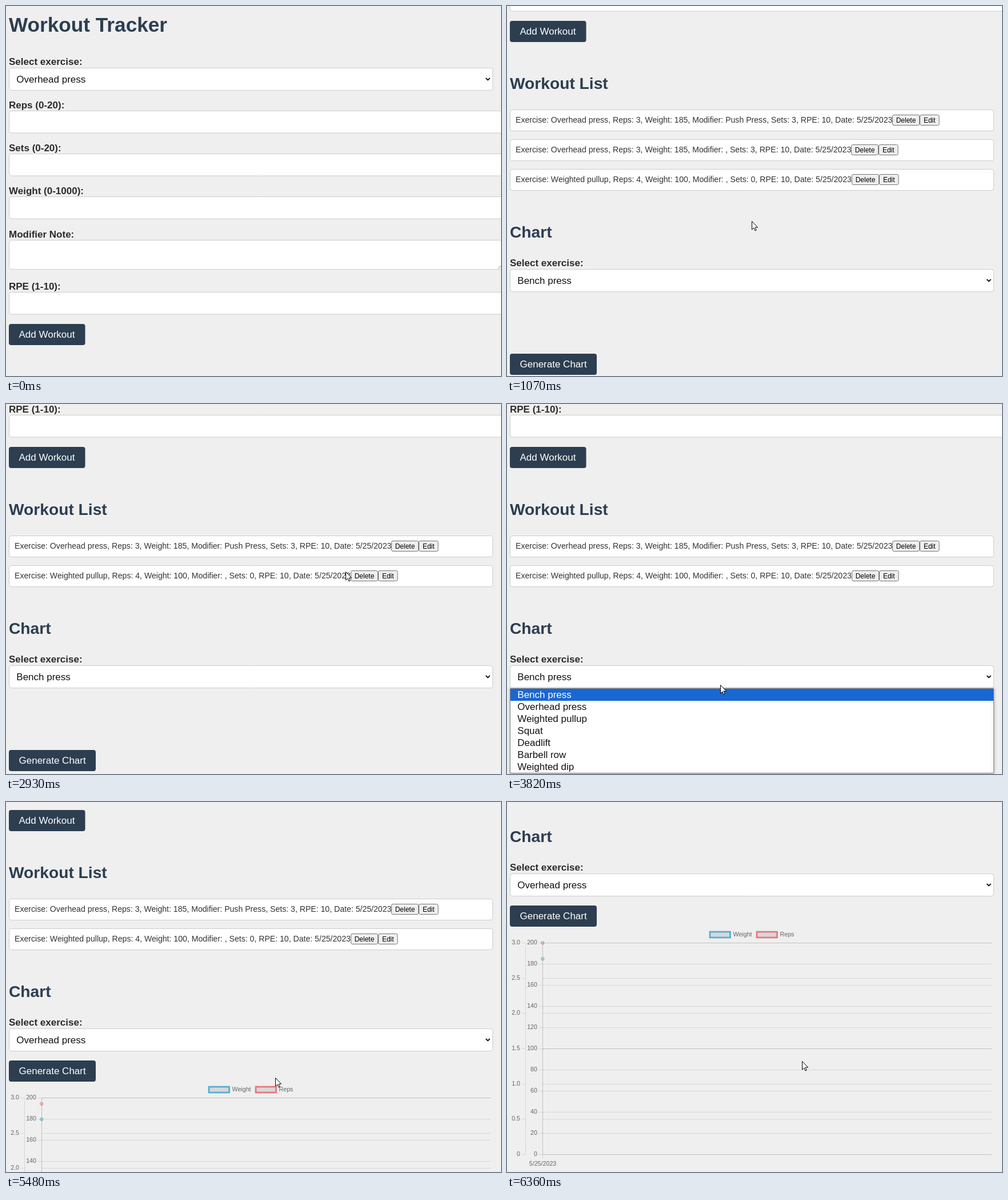
An HTML page with a canvas for the animation above (7.18 s loop, 866 by 647 pixels).

```html
<!DOCTYPE html>
<html lang="en">
<head>
<meta charset="utf-8">
<title>Workout Tracker</title>
<style>
html, body { margin: 0; width: 100%; height: 100%; overflow: hidden; background: #efefef; }
canvas { display: block; }
</style>
</head>
<body>
<canvas id="stage" width="866" height="647"></canvas>
<script>
const ctx = document.getElementById('stage').getContext('2d');
const LOOP = 7180, ENTER = 90, DELETED = 2300, POPUP_OPEN = 3750, CHOSEN = 4150, CHARTED = 4890;
const NAVY = '#2c3e50', INK = '#2b2b2b', GREY = '#666', FAINT = 'rgba(0,0,0,.1)';
const LEFT = 5, ROW_PITCH = 52, CLICK_LENGTH = 180;

// Each move is [start, end, ...destination]
const scrollMoves = [[392, 1100, 533], [DELETED, DELETED, 481], [5294, 5980, 813]];
const pointerMoves = [
  [ENTER, 700, 455, 382], [700, 1070, 428, 376], [1200, 1660, 620, 259], [1820, 2140, 624, 243],
  [2510, 2930, 594, 293], [2930, 3200, 377, 430], [3250, 3600, 372, 478], [3780, 3900, 375, 526],
  [4200, 4710, 66, 620], [4950, 5480, 471, 482], [5700, 6360, 516, 453]
];
const clicks = [2140, 3620, 4070, 4750];

const rowText = (exercise, reps, weight, modifier, sets) =>
  `Exercise: ${exercise}, Reps: ${reps}, Weight: ${weight}, Modifier: ${modifier}, Sets: ${sets}, RPE: 10, Date: 5/25/2023`;
const rows = [
  rowText('Overhead press', 3, 185, 'Push Press', 3),
  rowText('Overhead press', 3, 185, '', 3),
  rowText('Weighted pullup', 4, 100, '', 0)
];
const options = ['Bench press', 'Overhead press', 'Weighted pullup', 'Squat', 'Deadlift', 'Barbell row', 'Weighted dip'];

const arrow = new Path2D('M.5 .5V15l3.3-3.1 2.2 5.1 2.2-1-2.2-4.9h4.7z');
const hand = new Path2D('M0 11V2.5a1.5 1.5 0 0 1 3 0V8q2.8-.9 3 .8 2.6-.6 2.8 1 2.2-.2 2.2 1.6V15l-1.6 5.5H1.5L-3.5 13.5q.2-2.6 3.5-.5z');

const smooth = k => k * k * (3 - 2 * k);

function follow(moves, position, t) {
  for (const [start, end, ...goal] of moves) {
    if (t < start) break;
    const k = t < end ? smooth((t - start) / (end - start)) : 1;
    position = position.map((v, i) => v + (goal[i] - v) * k);
  }
  return position.map(Math.round);
}

function text(str, x, y, size = 17, color = INK, weight = 'normal', align = 'left') {
  ctx.font = `${weight} ${size}px "Liberation Sans", Arial, sans-serif`;
  ctx.fillStyle = color;
  ctx.textAlign = align;
  ctx.fillText(str, x, y);
}

function box(x, y, w, h, fill, stroke, radius = 4) {
  ctx.beginPath();
  ctx.roundRect(x, y, w, h, radius);
  ctx.fillStyle = fill;
  ctx.fill();
  if (!stroke) return;
  ctx.strokeStyle = stroke;
  ctx.lineWidth = 1;
  ctx.stroke();
}

function line(points, color = FAINT, width = 1) {
  ctx.beginPath();
  points.forEach(([x, y]) => ctx.lineTo(x, y));
  ctx.strokeStyle = color;
  ctx.lineWidth = width;
  ctx.stroke();
}

const heading = (str, y, size = 28.2) => text(str, LEFT, y, size, NAVY, 'bold');
const label = (str, y) => text(str, LEFT, y, 17, INK, 'bold');
const field = (y, h, w = 900) => box(LEFT + .5, y + .5, w, h, '#fff', '#ccc');

function select(value, y) {
  label('Select exercise:', y - 5);
  field(y, 39, 846);
  text(value, 18.3, y + 25.5, 17, '#111');
  line([[839.5, y + 18], [843, y + 21.5], [846.5, y + 18]], '#111', 1.9);
}

function bigButton(str, y, w, hovered) {
  box(LEFT, y, w, 37, hovered ? '#34495e' : NAVY);
  text(str, 22.5, y + 24, 17, '#fff');
}

function smallButton(str, x, y, w, hovered) {
  box(x, y, w, 18, hovered ? '#e2e2e2' : '#efefef', '#767676', 2.5);
  text(str, x + w / 2, y + 13.3, 12, '#000', 'normal', 'center');
}

function drawForm() {
  heading('Workout Tracker', 45, 35.2);
  select('Overhead press', 108);
  let y = 179;
  for (const name of ['Reps (0-20):', 'Sets (0-20):', 'Weight (0-1000):', 'Modifier Note:', 'RPE (1-10):']) {
    const multiline = name.startsWith('Modifier');
    const base = Math.round(y);
    label(name, base);
    field(base + 4, multiline ? 51 : 38.5);
    if (multiline) line([[861.5, base + 54], [868, base + 47.5]], '#777');
    y += multiline ? 91.2 : 75.2;
  }
  bigButton('Add Workout', 556, 133.5);
}

function drawList(visible, over) {
  heading('Workout List', 675);
  visible.forEach((row, i) => {
    const y = 711 + i * ROW_PITCH;
    field(y, 37, 846);
    text(row, 15, y + 23, 14.1, '#333');
    const end = Math.round(15 + ctx.measureText(row).width) + .5;
    smallButton('Delete', end, y + 9.5, 47, over(end, y + 9, 47, 19));
    smallButton('Edit', end + 48, y + 9.5, 33.5);
  });
}

function drawChart(age) {
  const top = 246.5, height = 370, bottom = top + height;
  const grow = 1 - (1 - Math.min(age / 1000, 1)) ** 4;

  function axis(x, steps, caption) {
    line([[x, top], [x, bottom]]);
    for (let i = 0; i <= steps; i++) {
      const y = Math.floor(bottom - i * height / steps) + .5;
      line([[x - 7, y], [x, y]]);
      line([[62, y], [848, y]]);
      text(caption(i), x - 9.5, y + 2.8, 10.7, GREY, 'normal', 'right');
    }
  }
  axis(32.5, 6, i => i ? (i / 2).toFixed(1) : '0');
  axis(62.5, 10, i => i * 20);
  line([[62.5, top], [62.5, bottom + 7]]);
  text('5/25/2023', 62.5, 635.5, 10.7, GREY, 'normal', 'center');

  [['Weight', '#52aed0', 185 / 200], ['Reps', '#e8757c', 1]].forEach(([name, color, value], i) => {
    const x = 355 + i * 82;
    ctx.fillStyle = FAINT;
    ctx.strokeStyle = color;
    ctx.lineWidth = 2.7;
    ctx.fillRect(x, 227, 35.5, 10);
    ctx.strokeRect(x, 227, 35.5, 10);
    text(name, x + 40.5, 235, 10.7, GREY);
    box(59.7, bottom - height * value * grow - 2.6, 5.2, 5.2, FAINT, color, 2.6);
  });
}

function drawPopup(y, hoverY) {
  const rowHeight = 21;
  const active = Math.max(0, Math.floor((hoverY - y) / rowHeight));
  ctx.shadowColor = 'rgba(0,0,0,.3)';
  ctx.shadowBlur = 5;
  box(LEFT + .5, y + .5, 846, options.length * rowHeight + 1, '#fff', '#888', 0);
  ctx.shadowBlur = 0;
  options.forEach((name, i) => {
    const rowY = y + 1 + i * rowHeight;
    if (i === active) box(6, rowY, 845, rowHeight, '#1967d2', null, 0);
    text(name, 18.3, rowY + 16, 17, i === active ? '#fff' : '#111');
  });
}

function drawPointer(x, y, shape, pressed) {
  ctx.save();
  ctx.translate(x, y);
  if (pressed) box(-11, -9, 22, 22, 'rgba(200,190,20,.75)', null, 11);
  ctx.fillStyle = '#fff';
  ctx.strokeStyle = '#000';
  ctx.lineWidth = 1;
  ctx.fill(shape);
  ctx.stroke(shape);
  ctx.restore();
}

function render(t) {
  const [scroll] = follow(scrollMoves, [0], t);
  const [px, py] = follow(pointerMoves, [866, 330], t);
  const over = (x, y, w, h) => px >= x && px < x + w && py + scroll >= y && py + scroll < y + h;
  const deleted = t >= DELETED, charted = t >= CHARTED;
  const shift = deleted ? -ROW_PITCH : 0;
  const buttonY = charted ? 994 : 1138 + shift;
  const onButton = over(LEFT, buttonY, 152, 37);

  ctx.fillStyle = '#efefef';
  ctx.fillRect(0, 0, 866, 647);
  ctx.save();
  ctx.translate(0, -scroll);
  drawForm();
  drawList(rows.filter((row, i) => !deleted || i !== 1), over);
  heading('Chart', 935 + shift);
  select(t < CHOSEN ? 'Bench press' : 'Overhead press', 990 + shift);
  bigButton('Generate Chart', buttonY, 152, onButton);
  if (t >= POPUP_OPEN && t < CHOSEN) drawPopup(1030 + shift, py + scroll);
  if (charted) {
    ctx.translate(0, 813);
    drawChart(t - CHARTED);
  }
  ctx.restore();
  const pressed = clicks.some(at => t >= at && t < at + CLICK_LENGTH);
  if (t >= ENTER) drawPointer(px, py, onButton ? hand : arrow, pressed);
}

const start = performance.now();
function tick() {
  render((performance.now() - start) % LOOP);
  requestAnimationFrame(tick);
}
tick();
</script>
</body>
</html>
```
